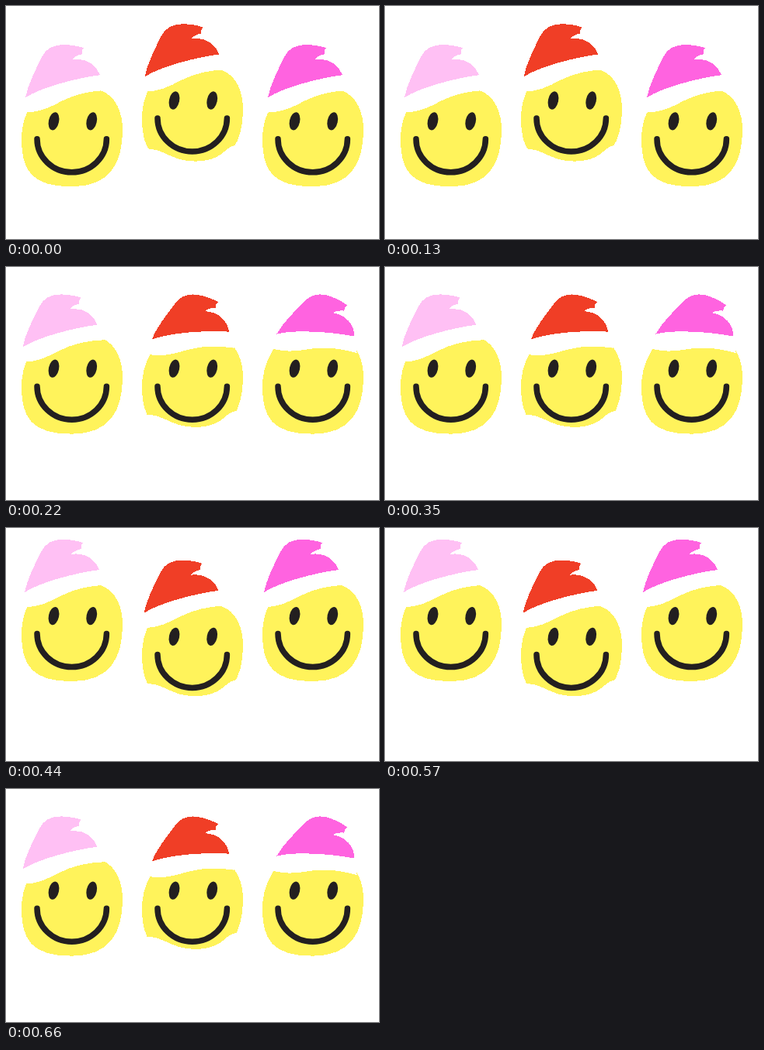
An HTML page that plays this animation: 480x301 px, repeating every 0.88 s.

```html
<!DOCTYPE html>
<html lang="en">
<head>
<meta charset="utf-8">
<title>Bobbing smileys</title>
<style>
  html, body { margin: 0; width: 100%; height: 100%; overflow: hidden; background: #fff; }
  svg { display: block; width: 100vw; height: 100vh; }
  .crisp { shape-rendering: crispEdges; }
</style>
</head>
<body>
<svg id="stage" viewBox="0 0 480 301" preserveAspectRatio="none">
  <defs>
    <g id="face">
      <path class="crisp" fill="#fff35b" d="M20 172C20 156 23 143 33 125C46 112 70 106 90 106C105 106 115 107 122 109C142 116 150 138 150 160C150 202 134 233 85 233C33 233 20 212 20 172Z"/>
      <g fill="#231f20">
        <ellipse rx="6.6" ry="11.8" transform="translate(61.5 148.5) rotate(12)"/>
        <ellipse rx="6.6" ry="11.8" transform="translate(110.2 148.5) rotate(12)"/>
      </g>
      <path fill="none" stroke="#231f20" stroke-width="7.5" stroke-linecap="round" d="M40 171.5A44.7 43 0 0 0 129.4 171.5"/>
    </g>
    <!-- the hat turns about its middle -->
    <g id="hat" class="crisp">
      <g transform="translate(-73 -84)">
        <path fill="#fff" d="M24 137.5C44 137 56 131 72 122.500C90 113.500 108 109.500 131 108.500L121 88L25 117Z"/>
        <path fill="currentColor" d="M25 118C28 102 38 82 46 66C52 53 64 49 78 50C86 50.300 94 52 100 54C98 56 97 59 98 62C93 63 88 65 85 69C102 66 116 75 121 89C90 93 45 105 25 118Z"/>
      </g>
    </g>
    <path id="trim" class="crisp" fill="#fff" d="M168 184.500H182C197 184 209 194 223 198C238 202 257 202 271 195C283 189 286 180 299 179.500L312 172V240H168Z"/>
  </defs>
</svg>
<script>
const STEP = 220;
const STEPS = 4;
const FACE_Y = -17.3;
const HAT_Y = 66.6;
const TRIM_Y = 8.2;

// lift: bob height, drift: hat shift with the bob, sway and tilt: hat swing at mid bob
const heads = [
  { x: 0, lift: 17.6, hatX: 72.5, drift: 0.5, sway: -3, tilt: 0, color: '#ffc0f4' },
  { x: 155, lift: -9.2, hatX: 226, drift: 0.5, sway: 15, tilt: 11, color: '#f03e26', trimmed: true },
  { x: 310, lift: 17.6, hatX: 382.5, drift: 2.5, sway: 22, tilt: 18.5, color: '#ff63e0' }
];

const stage = document.getElementById('stage');

function use(id) {
  const el = document.createElementNS('http://www.w3.org/2000/svg', 'use');
  el.setAttribute('href', '#' + id);
  stage.append(el);
  return el;
}

function place(el, x, y, angle = 0) {
  el.setAttribute('transform', `translate(${x} ${y}) rotate(${angle})`);
}

for (const head of heads) {
  head.face = use('face');
  if (head.trimmed) head.trim = use('trim');
  head.hat = use('hat');
  head.hat.style.color = head.color;
}

function draw(step) {
  const phase = step / STEPS * 2 * Math.PI;
  const bob = Math.cos(phase);
  const swing = Math.abs(Math.sin(phase));
  for (const h of heads) {
    const rise = h.lift * bob;
    place(h.face, h.x, FACE_Y + rise);
    place(h.hat, h.hatX + h.drift * bob + h.sway * swing, HAT_Y + rise + 3 * swing, h.tilt * swing);
    if (h.trim) place(h.trim, 0, TRIM_Y + 0.9 * rise - 2 * swing);
  }
}

const start = performance.now();
let shown = 0;
draw(0);

function tick(now) {
  const step = Math.floor(Math.max(0, now - start) / STEP) % STEPS;
  if (step !== shown) draw(shown = step);
  requestAnimationFrame(tick);
}
requestAnimationFrame(tick);
</script>
</body>
</html>
```
